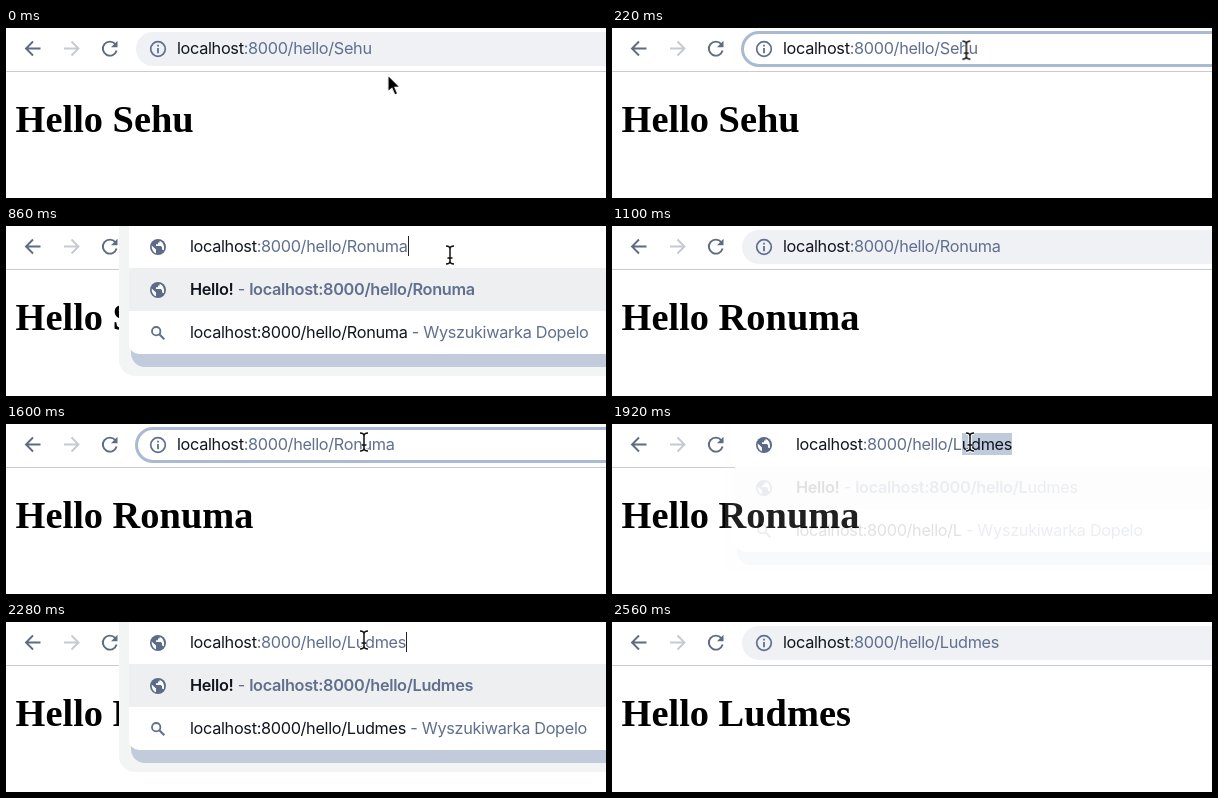
An HTML page that plays this animation: 600 px wide and 170 px high, repeating every 2.86 s.

```html
<!DOCTYPE html>
<html lang="en">
<head>
<meta charset="utf-8">
<title>Hello page</title>
<style>
html, body { margin: 0; width: 100%; height: 100%; overflow: hidden; background: #fff; }
.stage { position: relative; width: 600px; height: 170px; overflow: hidden; }
.stage div, .stage svg { position: absolute; }
.layer { left: 0; top: 0; width: 600px; height: 170px; }
.timed { opacity: 0; animation: 2.86s step-end infinite; }

.line { left: 0; top: 43px; width: 600px; height: 1px; background: #c9cbce; }
.title { left: 9.6px; top: 69px; font: bold 38.4px/44px "Liberation Serif", "Times New Roman", serif; white-space: pre; color: #000; }
.pill { left: 130px; top: 4px; width: 500px; height: 34px; border-radius: 17px; background: #eff1f4; }
.ring { left: 129px; top: 3px; width: 500px; height: 30px; border: 3px solid #a9bad2; border-radius: 18px; background: #fff; }

.text { left: 184px; font: 16.3px/20px Inter, Roboto, sans-serif; letter-spacing: -.02em; white-space: pre; color: #5f6f8d; }
.text b { font-weight: 600; }
.text i { font-style: normal; color: #10151f; }
.text mark { padding: 1px 0; background: #bfcadb; color: #10151f; }
.url { top: 10px; }
.rest { left: 171px; }
.picked, .picked i { color: transparent; }
.caret { display: inline-block; width: 1px; height: 20px; vertical-align: -4px; background: #222; }
.r1 { top: 53px; } .r2 { top: 96px; } .r3 { top: 139px; }

.icon { left: 143px; width: 18px; height: 18px; }
.i0 { top: 12px; } .i1 { top: 55px; } .i2 { top: 98px; } .i3 { top: 141px; }

.halo { left: 113px; top: -20px; width: 520px; height: 170px; border-radius: 16px; background: #f3f4f4; }
.band { left: 125px; top: 90px; width: 520px; height: 51px; border-radius: 14px; background: #c1cbdc; }
.sheet { left: 123px; top: -20px; width: 520px; height: 148px; border-radius: 10px; background: #fff; }
.tall .halo, .tall .sheet { height: 200px; }
.hot { left: 123px; top: 42px; width: 477px; height: 43px; background: #eeeff0; }
.field { left: 123px; top: 0; width: 477px; height: 42px; background: #fff; }
.over-line { height: 44px; }
.fade { animation: 2.86s linear infinite; }

.cursor { left: 0; top: 0; width: 1px; height: 1px; overflow: visible; animation: move 2.86s linear infinite; }

/* page and address states */
.page1  { animation-name: page1; }
.page2  { animation-name: page2; }
.page3  { animation-name: page3; }
.bar1   { animation-name: bar1; }
.bar2   { animation-name: bar2; }
.ring   { animation-name: ring; }
.picked { animation-name: picked; }
.open1  { animation-name: open1; }
.open2  { animation-name: open2; }
.typed1 { animation-name: typed1; }
.done1  { animation-name: done1; }
.typed2 { animation-name: typed2; }
.done2  { animation-name: done2; }
.fade1  { animation-name: fade1; }
.fade2  { animation-name: fade2; }
.arrow  { animation-name: arrow; }
.beam   { animation-name: beam; }
@keyframes page1  { 0% { opacity: 1 } 31.29%, to { opacity: 0 } }
@keyframes page2  { 0% { opacity: 0 } 31.29% { opacity: 1 } 84.44%, to { opacity: 0 } }
@keyframes page3  { 0% { opacity: 0 } 84.44%, to { opacity: 1 } }
@keyframes bar1   { 0% { opacity: 1 } 14.51%, to { opacity: 0 } }
@keyframes bar2   { 0% { opacity: 0 } 31.29% { opacity: 1 } 66.96%, to { opacity: 0 } }
@keyframes ring   { 0% { opacity: 0 } 7.52% { opacity: 1 } 14.51% { opacity: 0 } 55.42% { opacity: 1 } 66.96%, to { opacity: 0 } }
@keyframes picked { 0% { opacity: 0 } 10.31% { opacity: 1 } 14.51% { opacity: 0 } 57.87% { opacity: 1 } 66.96%, to { opacity: 0 } }
@keyframes open1  { 0% { opacity: 0 } 14.51% { opacity: 1 } 31.29%, to { opacity: 0 } }
@keyframes open2  { 0% { opacity: 0 } 66.96% { opacity: 1 } 84.44%, to { opacity: 0 } }
@keyframes typed1 { 0% { opacity: 1 } 24.3%, to { opacity: 0 } }
@keyframes done1  { 0% { opacity: 0 } 24.3%, to { opacity: 1 } }
@keyframes typed2 { 0% { opacity: 1 } 76.75%, to { opacity: 0 } }
@keyframes done2  { 0% { opacity: 0 } 76.75%, to { opacity: 1 } }
@keyframes fade1  { 0%, 14.51% { opacity: .12 } 17.48% { opacity: .95 } 18.88%, to { opacity: 1 } }
@keyframes fade2  { 0%, 67.14% { opacity: .12 } 69.93% { opacity: .95 } 71.33%, to { opacity: 1 } }
@keyframes arrow  { 0% { opacity: 1 } 4.02% { opacity: 0 } 32.7% { opacity: 1 } 38.29% { opacity: 0 } 45.28% { opacity: 1 } 53% { opacity: 0 } 88.64% { opacity: 1 } 89.34%, to { opacity: 0 } }
@keyframes beam   { 0% { opacity: 0 } 4.02% { opacity: 1 } 32.7% { opacity: 0 } 53% { opacity: 1 } 88.64%, to { opacity: 0 } }
@keyframes move {
  0% { transform: translate(382px, 47px) }
  8.39%, 11.19% { transform: translate(352px, 20px) }
  14.51%, 31.29% { transform: translate(444px, 29px) }
  34.27%, 38.29% { transform: translate(449px, 54px) }
  38.3%, 45.28% { transform: translate(440px, 150px) }
  55.94%, 88.63% { transform: translate(358px, 18px) }
  88.64%, to { transform: translate(382px, 79px) }
}
</style>
</head>
<body>
<svg width="0" height="0" style="position:absolute">
  <symbol id="info" viewBox="-9 -9 18 18">
    <circle r="7.3" fill="none" stroke="#5f6f8d" stroke-width="1.7"/>
    <path d="M0-1V4.2M0-4.3V-2.5" stroke="#5f6f8d" stroke-width="1.8"/>
  </symbol>
  <symbol id="globe" viewBox="-9 -9 18 18">
    <circle r="8" fill="#5b6b88"/>
    <path d="M-6.3-1.5L-2 2.6V6.3Q-6.6 4.5-6.3-1.5ZM1.6-6.2Q7.2-3.6 5.9 3.2L4 2.4V0L2.6-1H-2V-2.8H0V-4.4H1.6Z" fill="#fff"/>
  </symbol>
  <symbol id="lens" viewBox="-9 -9 18 18">
    <path d="M1.3 1.3L6.3 6.3" stroke="#5f6f8d" stroke-width="2"/>
    <circle cx="-1.8" cy="-1.8" r="4.2" fill="none" stroke="#5f6f8d" stroke-width="1.8"/>
  </symbol>
  <symbol id="ibeam" overflow="visible">
    <path d="M-4-9Q0-9 0-6Q0-9 4-9M0-6V6M-4 9Q0 9 0 6Q0 9 4 9M-2.5 3H2.5"/>
  </symbol>
</svg>

<div class="stage">
  <div class="line"></div>
  <svg class="layer" viewBox="0 0 600 170" fill="none" stroke="#5f6b80" stroke-width="1.9">
    <path d="M34.5 20.5H20.5M27 13.5L20 20.5L27 27.5"/>
    <path d="M58 20.5H72M65.5 13.5L72.5 20.5L65.5 27.5" stroke="#c6cad1"/>
    <path d="M109.3 16.2A7 7 0 1 0 110.6 22.5"/>
    <path d="M111.5 12.8V19.3H105Z" fill="#5f6b80" stroke="none"/>
  </svg>

  <div class="title timed page1">Hello Sehu</div>
  <div class="title timed page2">Hello Ronuma</div>
  <div class="title timed page3">Hello Ludmes</div>

  <div class="pill"></div>
  <div class="ring timed"></div>
  <svg class="icon i0"><use href="#info"/></svg>
  <div class="layer timed bar1">
    <div class="text url rest"><i>localhost</i>:8000/hello/Sehu</div>
    <div class="text url rest picked timed"><i>localhost</i>:8000/hello/<mark>Sehu</mark></div>
  </div>
  <div class="layer timed bar2">
    <div class="text url rest"><i>localhost</i>:8000/hello/Ronuma</div>
    <div class="text url rest picked timed"><i>localhost</i>:8000/hello/<mark>Ronuma</mark></div>
  </div>
  <div class="layer timed page3">
    <div class="text url rest"><i>localhost</i>:8000/hello/Ludmes</div>
  </div>

  <div class="layer timed open1">
    <div class="layer fade fade1">
      <div class="layer tall timed typed1">
        <div class="halo"></div><div class="sheet"></div><div class="hot"></div>
        <div class="text r1"><b><i>Hello!</i></b> - <b>localhost:8000/hello/R</b>onuma</div>
        <div class="text r2"><i>localhost:8000/hello/R</i> - Wyszukiwarka Dopelo</div>
        <div class="text r3"><b>localhost:8000/hello/r</b>onuma</div>
        <svg class="icon i3"><use href="#globe"/></svg>
      </div>
      <div class="layer timed done1">
        <div class="halo"></div><div class="band"></div><div class="sheet"></div><div class="hot"></div>
        <div class="text r1"><b><i>Hello!</i></b> - <b>localhost:8000/hello/Ronuma</b></div>
        <div class="text r2"><i>localhost:8000/hello/Ronuma</i> - Wyszukiwarka Dopelo</div>
      </div>
      <svg class="icon i1"><use href="#globe"/></svg>
      <svg class="icon i2"><use href="#lens"/></svg>
    </div>
    <div class="field"></div>
    <svg class="icon i0"><use href="#globe"/></svg>
    <div class="text url timed typed1"><i>localhost</i>:8000/hello/R<mark>onuma</mark></div>
    <div class="text url timed done1"><i>localhost</i>:8000/hello/Ronuma<span class="caret"></span></div>
  </div>

  <div class="layer timed open2">
    <div class="field over-line"></div>
    <div class="layer fade fade2">
      <div class="halo"></div><div class="band"></div><div class="sheet"></div><div class="hot"></div>
      <div class="layer timed typed2">
        <div class="text r1"><b><i>Hello!</i></b> - <b>localhost:8000/hello/L</b>udmes</div>
        <div class="text r2"><i>localhost:8000/hello/L</i> - Wyszukiwarka Dopelo</div>
      </div>
      <div class="layer timed done2">
        <div class="text r1"><b><i>Hello!</i></b> - <b>localhost:8000/hello/Ludmes</b></div>
        <div class="text r2"><i>localhost:8000/hello/Ludmes</i> - Wyszukiwarka Dopelo</div>
      </div>
      <svg class="icon i1"><use href="#globe"/></svg>
      <svg class="icon i2"><use href="#lens"/></svg>
    </div>
    <div class="field"></div>
    <svg class="icon i0"><use href="#globe"/></svg>
    <div class="text url timed typed2"><i>localhost</i>:8000/hello/L<mark>udmes</mark></div>
    <div class="text url timed done2"><i>localhost</i>:8000/hello/Ludmes<span class="caret"></span></div>
  </div>

  <svg class="cursor">
    <path class="timed arrow" d="M0 0V17L4 13.5L6.8 20L9.8 18.7L7 12.4H12.3Z" stroke="#fff" stroke-width="1.2"/>
    <g class="timed beam" fill="none">
      <use href="#ibeam" stroke="#fff" stroke-width="3.4"/>
      <use href="#ibeam" stroke="#111" stroke-width="1.5"/>
    </g>
  </svg>
</div>
</body>
</html>
```
